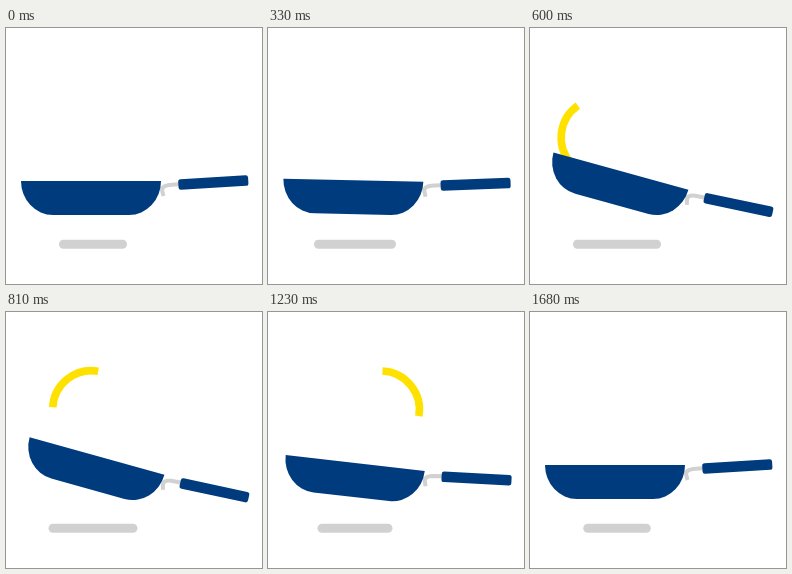
Animation, 256 px wide and 256 px high, one loop 1.71 s. Source, as an HTML page:

```html
<!DOCTYPE html>
<html lang="en">
<head>
<meta charset="utf-8">
<title>Frying pan loader</title>
<style>
  html, body { margin: 0; height: 100%; overflow: hidden; background: #fff; }
  svg { display: block; width: 100vw; height: 100vh; }
</style>
</head>
<body>
<svg viewBox="0 0 256 256">
  <!-- keeps the pancake above the pan's rim -->
  <clipPath id="above"><rect id="rim" x="-100" y="-200" width="460" height="360"/></clipPath>
  <path id="shadow" fill="none" stroke="#d1d1d1" stroke-width="9" stroke-linecap="round"/>
  <g clip-path="url(#above)">
    <path id="pancake" d="M-29 -25.8A38.8 38.8 0 0 1 29 -25.8" fill="none" stroke="#ffe100" stroke-width="7.6"/>
  </g>
  <g id="pan" fill="#003b7e">
    <path d="M175 156L163 157Q156 158 156 162L157.5 168" fill="none" stroke="#d1d1d1" stroke-width="4"/>
    <path d="M15 153H155A32 34 0 0 1 123 187H47A32 34 0 0 1 15 153Z"/>
    <rect x="172.3" y="149.2" width="70" height="10.6" rx="2.5" transform="rotate(-3.5 207.3 154.4)"/>
  </g>
</svg>
<script>
const LOOP = 1710, STEP = 30;
const $ = id => document.getElementById(id);

// Smooth curve through [time, value] points that never overshoots them.
function curve(...pts) {
  const slope = i => (pts[i + 1][1] - pts[i][1]) / (pts[i + 1][0] - pts[i][0]);
  const last = pts.length - 1;
  const tangent = i => {
    if (i === 0 || i === last) return 0;
    const a = slope(i - 1), b = slope(i);
    return a * b > 0 ? 2 * a * b / (a + b) : 0;
  };
  return t => {
    if (t <= pts[0][0]) return pts[0][1];
    if (t >= pts[last][0]) return pts[last][1];
    const i = pts.findIndex(p => p[0] > t) - 1;
    const [t0, v0] = pts[i], [t1, v1] = pts[i + 1];
    const d = t1 - t0, u = (t - t0) / d, w = 1 - u;
    return v0 * w * w * (1 + 2 * u) + v1 * u * u * (3 - 2 * u)
      + d * u * w * (tangent(i) * w - tangent(i + 1) * u);
  };
}

const tilt = curve([200, 0], [330, 1.2], [465, 8], [600, 15.4], [780, 15.6],
  [990, 15], [1080, 11.7], [1230, 6.6], [1410, 2], [1680, 0]);
const drop = curve([600, 0], [990, 2], [1230, 2.4], [1410, 2], [1680, 0]);
const spread = curve([0, 59], [150, 64.5], [330, 73], [600, 79], [800, 80],
  [990, 76], [1230, 66], [1410, 61], [1680, 58.5]);
const cakeX = curve([420, 64], [540, 67], [600, 70], [990, 99], [1230, 112.6],
  [1410, 123], [1620, 112], [1680, 106]);
const cakeY = curve([420, 168], [480, 143], [540, 120], [600, 109.5], [780, 98.5],
  [990, 93.3], [1095, 91.8], [1230, 97.7], [1410, 114], [1620, 137], [1680, 160]);

function draw(now) {
  const t = Math.floor(now % LOOP / STEP) * STEP;
  const pose = `translate(0 ${drop(t)}) rotate(${tilt(t)} 124.5 170)`;
  $("pan").setAttribute("transform", pose);
  $("rim").setAttribute("transform", pose);

  const half = spread(t) / 2;
  $("shadow").setAttribute("d", `M${87 - half} 216.3H${87 + half}`);

  const spin = (t - 990) * 0.213;
  $("pancake").setAttribute("transform", `translate(${cakeX(t)} ${cakeY(t)}) rotate(${spin})`);
  $("pancake").setAttribute("visibility", t > 420 && t < 1650 ? "visible" : "hidden");
  requestAnimationFrame(() => draw(performance.now() - start));
}

const start = performance.now();
draw(0);
</script>
</body>
</html>
```
